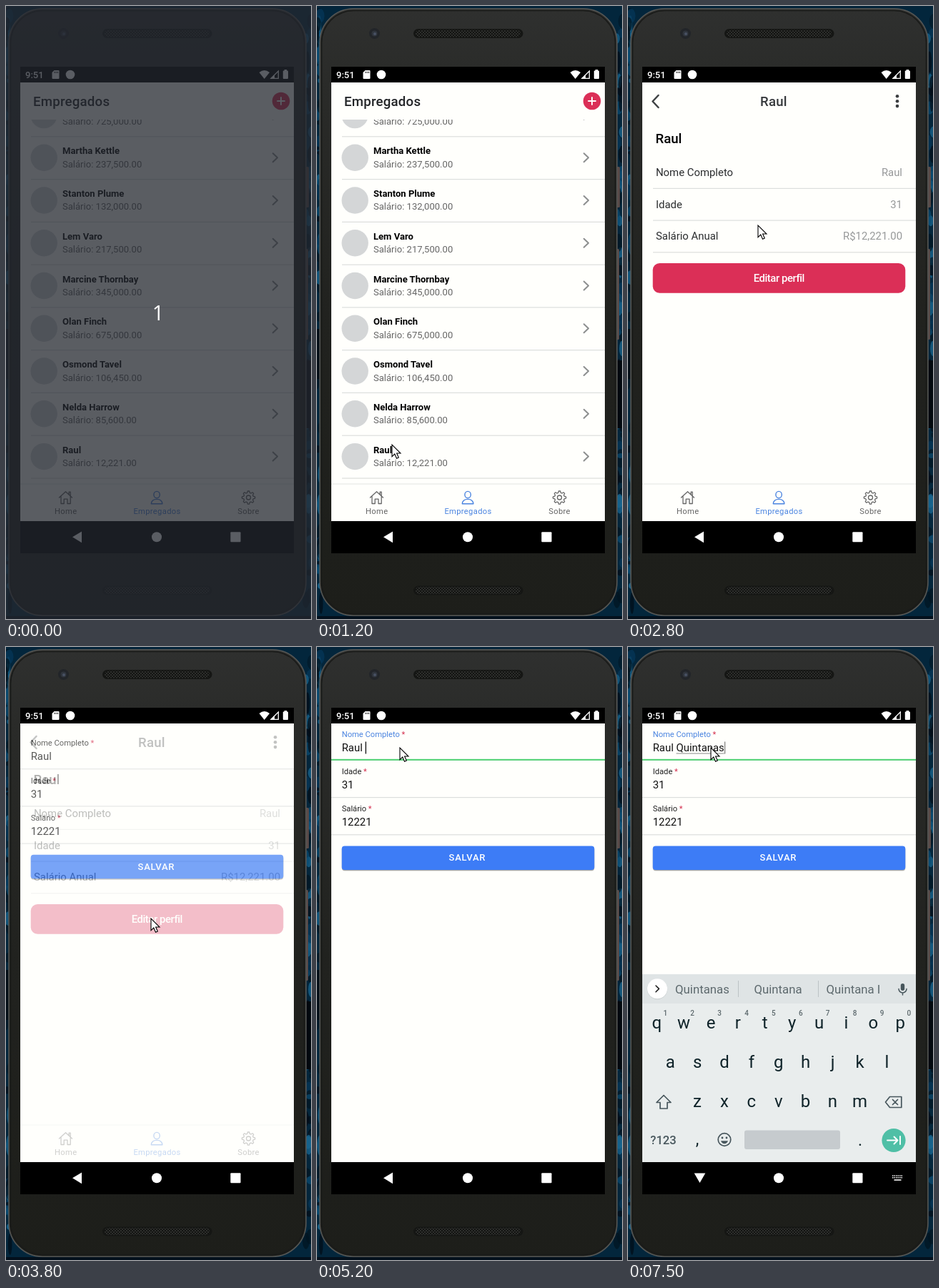
Recreate the animation shown at these times as an HTML page. Size 427 px wide and 858 px high, loop 8 s.

```html
<!DOCTYPE html>
<html lang="pt">
<head>
<meta charset="utf-8">
<title>Empregados</title>
<style>
  html, body { margin: 0; width: 100%; height: 100%; overflow: hidden; background: #03131f; }
  svg { display: block; width: 427px; height: 858px; font-family: Roboto, "Liberation Sans", sans-serif; }
  text { white-space: pre; }
  .mid { text-anchor: middle; }
  .end { text-anchor: end; }
  .med { font-weight: 500; }
  .line { fill: none; stroke-linecap: round; stroke-linejoin: round; }
</style>
</head>
<body>
<svg id="stage" viewBox="0 0 427 858" xmlns="http://www.w3.org/2000/svg"></svg>
<script>
const LOOP = 8000, STEP = 100;
const PAPER = '#fffffc', RULE = '#dcdedd', RED = '#db2f57', BLUE = '#4a84e0';
const NAME = 'Raul';
const PEOPLE = [
  ['Martha Kettle', '237,500.00'], ['Stanton Plume', '132,000.00'], ['Lem Varo', '217,500.00'],
  ['Marcine Thornbay', '345,000.00'], ['Olan Finch', '675,000.00'], ['Osmond Tavel', '106,450.00'],
  ['Nelda Harrow', '85,600.00'], [NAME, '12,221.00']
];

const rect = (x, y, w, h, fill, more = '') =>
  `<rect x="${x}" y="${y}" width="${w}" height="${h}" fill="${fill}" ${more}/>`;
const disc = (x, y, r, fill, more = '') => `<circle cx="${x}" cy="${y}" r="${r}" fill="${fill}" ${more}/>`;
const text = (x, y, size, fill, str, more = '') =>
  `<text x="${x}" y="${y}" font-size="${size}" fill="${fill}" ${more}>${str}</text>`;
const path = (d, fill, more = '') => `<path d="${d}" fill="${fill}" ${more}/>`;
const line = (d, color, width, more = '') =>
  `<path class="line" d="${d}" stroke="${color}" stroke-width="${width}" ${more}/>`;
const rule = (y, x = 35) => rect(x, y, 403 - x, 1.2, RULE);

let seed = 7;
const rand = () => (seed = (seed * 16807) % 2147483647) / 2147483647;

function backdrop() {
  let out = rect(0, 0, 427, 858, '#03263c');
  const blues = ['#0b4d73', '#021420', '#06385a', '#010c15', '#1a6a94'];
  for (let i = 0; i < 130; i++) {
    const x = i % 2 ? 418 + rand() * 10 : rand() * 7;
    out += `<ellipse cx="${x}" cy="${rand() * 858}" rx="${2 + rand() * 5}" ry="${2 + rand() * 14}"
      fill="${blues[i % 5]}" opacity=".7"/>`;
  }
  out += rect(0, 452, 5, 70, '#020d16') + rect(418, 496, 9, 95, '#02080e');
  return out + rect(0, 0, 427, 3, '#04243a') + rect(0, 854, 427, 4, '#03101c');
}

function phone() {
  const speaker = y => rect(135, y, 153.5, 13, '#151614', 'rx="6.5"') +
    rect(138, y + 1.5, 147, 10, 'url(#mesh)', 'rx="5"');
  return rect(418, 225, 6, 57, '#594a48', 'rx="1.5"') + rect(418, 340, 5, 127, '#594a48', 'rx="1.5"') +
    rect(4, 3.7, 416, 849.5, 'url(#body)', 'rx="47" stroke="#565755" stroke-width="1.6"') +
    rect(6.5, 6.5, 411, 844, 'none', 'rx="45" stroke="#1a1b19" stroke-width="1.6"') +
    speaker(32) + speaker(811.5) +
    disc(80.5, 38.5, 7.5, '#222529') + disc(80.5, 38.5, 4, '#30353d') + disc(81, 39, 2, '#485163') +
    rect(20, 85, 383, 681, '#000');
}

function statusBar() {
  return text(27, 101, 13, '#fff', '9:51', 'class="med"') +
    path('M67.5 90H73.5Q74.5 90 74.5 91V101Q74.5 102 73.5 102H65.5Q64.5 102 64.5 101V93Z', '#fff') +
    path('M68 91.7v2.3M70.2 91.7v2.3M72.4 91.7v2.3', 'none', 'stroke="#000" stroke-width=".9"') +
    disc(90, 96, 6.3, '#fff') +
    path('M354.5 93Q361.7 87 369 93L361.7 102Z', '#fff') +
    path('M371 101.3L381.3 91V101.3Z', 'none', 'stroke="#fff" stroke-width="1.3"') +
    path('M376 101.5V96.3L371 101.5Z', '#fff') +
    rect(387.8, 90.5, 7.2, 11.5, '#fff', 'rx="1"') + rect(389.6, 89, 3.6, 2, '#fff');
}

const more = y => line(`M373.7 ${y - 6}l6.3 6l-6.3 6`, '#8d8f8f', 2);

function listPage() {
  const salary = (y, sum) => text(79, y, 13.05, '#666', 'Salário: ' + sum);
  let rows = disc(53, 152.6, 18.7, '#d4d6d7') + salary(166, '725,000.00') + more(152.6);
  PEOPLE.forEach(([name, sum], i) => {
    const y = 182.2 + 59.77 * i;
    rows += rule(y) + disc(53.2, y + 30, 18.7, '#d4d6d7') +
      text(79, y + 25, 13.05, '#000', name, 'font-weight="700"') + salary(y + 43.5, sum) + more(y + 30);
  });
  return rect(20, 107, 383, 562, PAPER) + rows + rule(660.4) + rect(20, 107, 383, 52, PAPER) +
    text(38, 139.7, 18.64, '#222427', 'Empregados', 'class="med" letter-spacing=".23"') +
    disc(385, 133, 12.3, RED) + line('M380 133h10M385 128v10', '#fff', 1.9);
}

function detailPage() {
  const fields = [['Nome Completo', NAME], ['Idade', '31'], ['Salário Anual', 'R$12,221.00']];
  return rect(20, 107, 383, 602, PAPER) +
    line('M42.5 125L34.5 133.5L42.5 142', '#3f4244', 2.5) +
    text(204, 139.7, 18.64, '#36393c', NAME, 'class="mid med" letter-spacing=".23"') +
    [126.3, 133.2, 140.1].map(y => disc(377, y, 2.3, '#3b3e40')).join('') +
    text(38.5, 191.5, 18.64, '#000', NAME, 'class="med"') +
    fields.map(([label, value], i) => {
      const y = 238 + 44.7 * i;
      return text(39, y, 14.9, '#2b2d2f', label) + text(384, y, 14.9, '#969899', value, 'class="end"') +
        rule(y + 16.8);
    }).join('') +
    rect(34.7, 360, 353.6, 41.8, RED, 'rx="9.5"') +
    text(211.3, 385.6, 14.9, '#fff', 'Editar perfil', 'class="mid med" letter-spacing="-.447"');
}

function gear(cx, cy) {
  const pts = [];
  for (let i = 0; i < 48; i++) {
    const a = i / 48 * 2 * Math.PI, r = 8 + 1.2 * Math.tanh(3 * Math.cos(8 * a));
    pts.push((cx + r * Math.sin(a)).toFixed(1) + ' ' + (cy - r * Math.cos(a)).toFixed(1));
  }
  return line('M' + pts.join('L') + 'Z', '#666', 1.3) + disc(cx, cy, 3, 'none', 'stroke="#666" stroke-width="1.3"');
}

function tabBar() {
  const label = (x, color, str) => text(x, 710.6, 11.18, color, str, 'class="mid" letter-spacing=".335"');
  return rect(20, 669, 383, 52, PAPER) + rect(20, 668.5, 383, 1, '#e4e6e4') +
    line('M74.5 688L83.5 679.7L92.5 688M77 686v10.5h4.2v-6.3h4.8v6.3h4.2v-10.5M88.2 683.5v-3.4h2v5.4', '#666', 1.3) +
    line('M206.9 684a4.2 4.6 0 1 0 8.4 0a4.2 4.6 0 1 0 -8.4 0M203.3 696.7q.6-6.3 7.8-6.3t7.8 6.3z', BLUE, 1.4) +
    gear(339.5, 688) + label(83.7, '#666', 'Home') + label(211.5, BLUE, 'Empregados') + label(339.5, '#666', 'Sobre');
}

function formPage() {
  const fields = [['Nome Completo', NAME + ' '], ['Idade', '31'], ['Salário', '12221']];
  return rect(20, 107, 383, 654, PAPER) +
    fields.map(([label, value], i) => {
      const y = 126 + 52.2 * i;
      return text(34.7, y, 11.18, '#222', `<tspan id="label${i}">${label}</tspan><tspan fill="#d5304f"> *</tspan>`) +
        text(34.7, y + 20, 14.9, '#111', value, `id="value${i}"`) + rule(y + 31.8, 20);
    }).join('') +
    rect(20, 156.8, 383, 2, '#4fd273', 'id="focusLine"') +
    rect(35, 280, 353.3, 33.8, '#000', 'rx="4" opacity=".12"') +
    rect(34.7, 279.6, 353.6, 33.3, '#000', 'rx="4" opacity=".25"') +
    rect(34.7, 278.5, 353.6, 33.5, '#3d7cf6', 'rx="4"') +
    text(184.5, 299.3, 13.05, '#fff', 'SALVAR', 'class="med" letter-spacing=".78"') +
    rect(68, 148.5, 0, 1, '#8a8c8c', 'id="under"') + rect(68, 132.5, 1.3, 17, '#111', 'id="caret"');
}

function keyboard() {
  const INK = '#0f2329', SOFT = '#47565c';
  const keys = (str, x, y) => [...str].map((c, i) => text(x + 37.9 * i, y, 24, INK, c, 'class="mid"')).join('');
  let out = rect(20, 458, 383, 41, '#dfe4e5') + rect(20, 499, 383, 222, '#e9eded') +
    disc(41, 479, 14.2, '#c9cfd0') + disc(41, 478.3, 14, '#fff') + line('M39 474l4.4 4.4l-4.4 4.4', '#222', 1.6) +
    rect(154, 467, 1, 23, '#bcc3c5') + rect(266, 467, 1, 23, '#bcc3c5');
  [104, 210, 315.5].forEach((x, i) => out += text(x, 485.3, 16.8, '#5d696d', '', `class="mid" id="hint${i}"`));
  out += rect(381.8, 471, 5.4, 10, SOFT, 'rx="2.7"') + line('M379 478.5a5.5 5.5 0 0 0 11 0M384.5 484v3', SOFT, 1.5);
  out += keys('qwertyuiop', 40.2, 533.8) + keys('asdfghjkl', 59.2, 588.6) + keys('zxcvbnm', 97, 643.6);
  for (let i = 0; i < 10; i++)
    out += text(52.3 + 37.9 * i, 516, 10, '#5d696d', (i + 1) % 10, 'class="mid med"');
  return out +
    line('M50 627.5l10 10h-5v8.5h-10v-8.5h-5z', SOFT, 1.7) +
    line('M366.5 629.5h16.3v15h-16.3l-6-7.5zM370.5 633.5l7 7M377.5 633.5l-7 7', SOFT, 1.7) +
    text(49.5, 695.8, 16.6, SOFT, '?123', 'class="mid med"') +
    text(97, 697, 23, INK, ',', 'class="mid"') + text(325, 698, 23, INK, '.', 'class="mid"') +
    disc(135, 689.5, 8.8, 'none', `stroke="${SOFT}" stroke-width="1.7"`) +
    disc(132, 687, 1.4, SOFT) + disc(138, 687, 1.4, SOFT) + path('M130 691.3h10q-1.6 4-5 4t-5-4z', SOFT) +
    rect(163, 676.5, 134, 26.5, '#c6cbce', 'rx="3"') + disc(372, 690.5, 16.6, '#4fbfa6') +
    line('M363 690.5h14M372.5 685.5l5 5l-5 5M381 685v11', '#fff', 1.9);
}

function navBar() {
  let dots = '';
  for (let r = 0; r < 2; r++)
    for (let c = 0; c < 6; c++) dots += rect(370 + c * 2.5, 739.3 + r * 2.7, 1.5, 1.5, '#fff');
  return path('M93 743.3L106 735.5V751.2Z', '#fff', 'id="back"') +
    `<g id="down">${path('M92.7 736.5H108.3L100.5 750Z', '#fff')}${dots}${rect(372.5, 745.2, 10, 1.6, '#fff')}</g>` +
    disc(211, 743.3, 7, '#fff') + rect(314.3, 736.3, 14.2, 14, '#fff', 'rx="1"');
}

const stage = document.getElementById('stage');
stage.innerHTML = `<defs>
  <linearGradient id="body" x1="0" y1="0" x2="0" y2="1">
    <stop offset="0" stop-color="#2f302f"/><stop offset=".12" stop-color="#2a2b29"/>
    <stop offset=".5" stop-color="#21221f"/><stop offset="1" stop-color="#1d1e1a"/></linearGradient>
  <pattern id="mesh" width="4" height="4" patternUnits="userSpaceOnUse">
    ${rect(0, 0, 4, 4, '#121311')}${disc(1, 1, 0.9, '#3a3b39')}${disc(3, 3, 0.9, '#3a3b39')}</pattern>
  <clipPath id="screen"><rect x="20" y="107" width="383" height="614"/></clipPath></defs>` +
  backdrop() + phone() + statusBar() +
  `<g clip-path="url(#screen)">${listPage()}<g id="detail">${detailPage()}</g>${tabBar()}
  <g id="form">${formPage()}</g><g id="keys">${keyboard()}</g></g>` + navBar() +
  path('M0 0V16.6L3.8 13L6.5 19.3L9.3 18L6.6 12H12Z', '#fff', 'id="cursor" stroke="#000" stroke-width="1.1"') +
  `<g id="shade">${rect(0, 0, 427, 858, '#23272f', 'opacity=".75"')}
  ${text(213, 439.5, 29, '#fff', '1', 'class="mid" style="font-family:\'Open Sans\',sans-serif"')}</g>`;

const $ = id => document.getElementById(id);
const show = (id, on) => $(id).setAttribute('visibility', on ? 'visible' : 'hidden');
const clamp = v => Math.max(0, Math.min(1, v));
const easeOut = p => 1 - Math.pow(1 - p, 3.5);

// pointer stops: time, x, y
const TRAIL = [
  [500, 400, 500], [800, 260, 545], [1200, 105, 614], [1600, 105, 614], [2000, 200, 420], [2400, 340, 158],
  [2600, 248, 225], [2800, 182, 307], [2900, 171, 342], [3200, 213, 403], [3400, 203, 380], [3900, 203, 380],
  [4400, 96, 190], [4600, 115, 157], [4800, 116, 141], [8000, 116, 141]
];
// typed surname by time, then the suggestions by time
const TYPED = [[0, ''], [6300, 'Qu'], [6700, 'Quint'], [6900, 'Quintan'], [7200, 'Quintanas']];
const HINTS = [
  [0, 'is', 'and', 'I'], [6300, 'Qu', 'Que', 'Qui'], [6500, 'Qu', 'Quite', 'Quickly'],
  [6700, 'Quint', 'Quinta', 'Quintal'], [6900, 'Quintan', 'Quintana', 'Quintana I'],
  [7200, 'Quintana', 'Quintana', 'Quintana I'], [7500, 'Quintanas', 'Quintana', 'Quintana I']
];
const latest = (list, t) => list.filter(e => e[0] <= t).pop();

function pointer(t) {
  const i = Math.max(1, TRAIL.findIndex(s => s[0] >= t));
  const [a, b] = [TRAIL[i - 1], TRAIL[i]];
  const p = clamp((t - a[0]) / (b[0] - a[0]));
  return [1, 2].map(k => Math.round(a[k] + (b[k] - a[k]) * p));
}

function enter(id, t, start) {
  const p = easeOut(clamp((t - start) / 280));
  show(id, p > 0);
  $(id).setAttribute('opacity', p);
  $(id).setAttribute('transform', `translate(0 ${(40 * (1 - p)).toFixed(2)})`);
}

function draw(t) {
  show('shade', t < 400);
  show('cursor', t >= 500);
  $('cursor').setAttribute('transform', `translate(${pointer(t).join(' ')})`);
  enter('detail', t, 1420);
  enter('form', t, 3720);

  const focus = clamp((t - 5000) / 200);
  const rise = easeOut(clamp((t - 5200) / 400));
  $('label0').setAttribute('fill', focus ? BLUE : '#222');
  $('focusLine').setAttribute('opacity', focus);
  $('keys').setAttribute('transform', `translate(0 ${(263 * (1 - rise)).toFixed(2)})`);
  show('keys', rise > 0);
  show('down', rise > 0);
  show('back', rise === 0);

  const field = $('value0'), word = latest(TYPED, t)[1];
  field.textContent = NAME + ' ';
  const from = 34.7 + field.getComputedTextLength();
  field.textContent = NAME + ' ' + word;
  const to = 34.7 + field.getComputedTextLength();
  $('under').setAttribute('x', from);
  $('under').setAttribute('width', Math.max(0, to - from));
  $('caret').setAttribute('x', to + 0.2);
  $('caret').setAttribute('opacity', focus ? (t >= 7500 ? 0.5 : 1) : 0);
  latest(HINTS, t).slice(1).forEach((h, i) => { $('hint' + i).textContent = h; });
}

// the screen refreshes ten times a second
let drawn = -1;
function tick(now) {
  const t = Math.floor((now % LOOP) / STEP) * STEP;
  if (t !== drawn) draw(drawn = t);
  requestAnimationFrame(tick);
}
draw(0);
requestAnimationFrame(tick);
</script>
</body>
</html>
```
